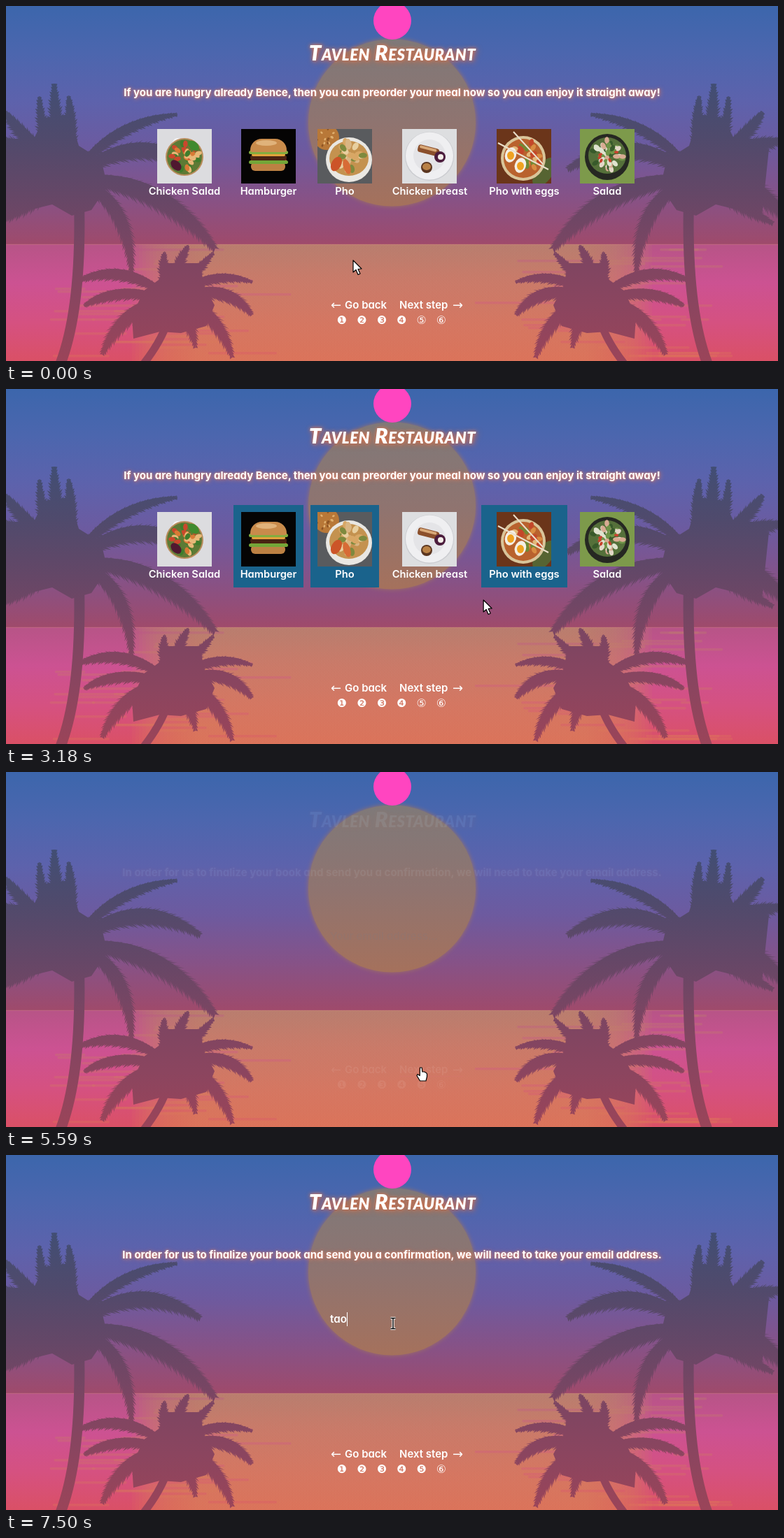
Recreate the animation shown at these times as an HTML page with a canvas. Size 1103 by 508 pixels, loop 8000 ms.

```html
<!DOCTYPE html>
<html lang="en">
<head>
<meta charset="utf-8">
<title>Meal preorder</title>
<style>
html, body { margin: 0; width: 100%; height: 100%; overflow: hidden; background: #5d60a6; }
#stage { position: relative; width: 1103px; height: 508px; overflow: hidden; color: #fff;
  font: 600 14.7px/1 Inter, "Noto Sans", sans-serif; font-feature-settings: "cv11"; cursor: default; }
canvas, .page, .item, .text, .line { position: absolute; left: 0; top: 0; }
.page { width: 1103px; height: 508px; transform-origin: 50% 254px; }
.text { white-space: pre; transform: translate(-50%, -50%); }
.left { transform: translate(0, -50%); }
.title { font: italic 900 31px/1 Lato, "Open Sans", sans-serif; font-variant: small-caps; letter-spacing: 0.5px;
  text-shadow: 2px 2px 8px #d9683f, 0 0 5px #d9805f; }
.head { font-weight: 700; font-size: 15px; text-shadow: 1px 1px 6px #e2795b, 0 0 3px #d98c78; }
.nav { font-size: 15px; }
.arrow { font: 400 18px/1 "DejaVu Sans", sans-serif; }
.dot { font: 400 16px/1 "DejaVu Sans", sans-serif; }
.item { top: 166px; height: 118px; box-sizing: border-box; border: 1px solid transparent; }
.line { left: 562px; top: 436.5px; width: 91px; height: 1.5px; background: #f45fa6; }
.field { display: flex; align-items: center; height: 20px; font-size: 15.2px; }
.caret { width: 1px; height: 20px; margin-right: -1px; background: #fff; }
.hint { color: #3f87bd; font-weight: 500; }
</style>
</head>
<body>
<div id="stage"></div>
<script>
const W = 1103, H = 508, LOOP = 8000, SWAP = 5590;
const stage = document.getElementById('stage');

function add(parent, tag, cls = '') {
  const el = document.createElement(tag);
  el.className = cls;
  parent.appendChild(el);
  return el;
}
function makeCanvas(parent, w, h) {
  const c = add(parent, 'canvas');
  c.width = w;
  c.height = h;
  return c.getContext('2d');
}
function text(parent, str, x, y, cls = '') {
  const el = add(parent, 'div', 'text ' + cls);
  el.textContent = str;
  el.style.left = x + 'px';
  el.style.top = y + 'px';
  return el;
}
function seeded(s) {
  return () => (s = (s * 16807) % 2147483647) / 2147483647;
}

// ---------- scenery ----------
const bg = makeCanvas(stage, W, H);

function vertical(y0, y1, ...colors) {
  const g = bg.createLinearGradient(0, y0, 0, y1);
  colors.forEach((c, i) => g.addColorStop(i / (colors.length - 1), c));
  return g;
}

function drawSky() {
  bg.fillStyle = vertical(0, 341, '#3c66ac', '#4c66ae', '#5d62ac', '#6d5a9f', '#865287', '#9f4a6b');
  bg.fillRect(0, 0, W, 341);
  bg.save();
  bg.shadowColor = '#a0735f';
  bg.shadowBlur = 6;
  bg.fillStyle = vertical(48, 287, '#7f7979', '#8f7470', '#a5715c');
  bg.beginPath();
  bg.arc(551.5, 167, 119.5, 0, 7);
  bg.fill();
  bg.restore();
}

function drawSea() {
  const pink = vertical(341, H, '#b75487', '#cc5292', '#d55181', '#da5066');
  const orange = vertical(341, H, '#bd826a', '#cb7d61', '#df7856');
  const rnd = seeded(77);
  bg.fillStyle = pink;
  bg.fillRect(0, 341, W, H);
  bg.fillStyle = orange;
  bg.globalAlpha = 0.1;
  for (let i = 0; i < 42; i++) {
    const x = 180 + i * 5;
    bg.fillRect(x, 341, W - 2 * x, H);
  }
  bg.globalAlpha = 0.3;
  for (let i = 0; i < 64; i++) {
    const y = 347 + Math.floor(rnd() * 39) * 4;
    const w = 40 + rnd() * 110, x = 60 + rnd() * 230;
    bg.fillStyle = x + w / 2 > 235 ? pink : orange;
    bg.beginPath();
    bg.roundRect(i % 2 ? x : W - x - w, y, w, 3.5, 2);
    bg.fill();
  }
  bg.globalAlpha = 0.25;
  bg.fillStyle = '#d98a80';
  bg.fillRect(0, 340.5, W, 1.5);
  bg.globalAlpha = 1;
}

// A curved blade, dense along the rib, with pointed leaflets at its edges.
function frond(x0, y0, cx, cy, x1, y1, len) {
  const n = Math.round(Math.hypot(x1 - x0, y1 - y0) / 4);
  for (let i = 1; i <= n; i++) {
    const t = i / n, u = 1 - t;
    const px = u * u * x0 + 2 * u * t * cx + t * t * x1;
    const py = u * u * y0 + 2 * u * t * cy + t * t * y1;
    let dx = u * (cx - x0) + t * (x1 - cx), dy = u * (cy - y0) + t * (y1 - cy);
    const d = Math.hypot(dx, dy) || 1;
    dx /= d;
    dy /= d;
    const fat = Math.sin(Math.PI * (0.1 + 0.86 * t));
    const l = len * (0.25 + 0.85 * fat) * [1, 0.8, 0.92][i % 3];
    bg.beginPath();
    bg.arc(px, py, 1 + len * 0.3 * fat, 0, 7);
    bg.fill();
    for (const s of [-1, 1]) {
      bg.beginPath();
      bg.moveTo(px - dx * 7, py - dy * 7);
      bg.lineTo(px + dx * 5, py + dy * 5);
      bg.lineTo(px + dx * l * 0.75 - dy * s * l * 0.55, py + dy * l * 0.75 + dx * s * l * 0.55 + l * 0.2);
      bg.fill();
    }
  }
}

const BIG = {
  base: [92, 248], trunk: [104, 262, 110, 430, 77, 514], width: 15,
  crown: [[54, 160], [90, 155], [104, 200], [136, 220], [145, 258], [122, 292], [94, 300], [66, 284],
    [0, 300], [-10, 205], [40, 190]],
  fronds: [
    [70, 190, 69, 116, 23], [95, 180, 90, 133, 18], [52, 210, 48, 134, 20],
    [30, 190, 2, 155, 22], [40, 195, -24, 192, 28], [20, 235, -34, 300, 32], [45, 275, -12, 308, 20],
    [148, 166, 240, 155, 17], [185, 170, 274, 230, 27], [220, 240, 296, 343, 31], [175, 265, 179, 377, 23]
  ]
};
const SMALL = {
  base: [237, 420], trunk: [234, 440, 226, 475, 195, 514], width: 11,
  crown: [[230, 368], [278, 368], [282, 398], [298, 428], [286, 458], [250, 468], [220, 466], [182, 476],
    [180, 445], [196, 408], [218, 392]],
  fronds: [
    [240, 375, 258, 346, 17], [222, 385, 226, 356, 16], [262, 388, 293, 356, 16],
    [170, 362, 104, 392, 18], [158, 398, 115, 426, 17], [168, 425, 139, 494, 22],
    [290, 374, 348, 393, 15], [315, 390, 349, 438, 20], [300, 425, 322, 498, 21], [262, 435, 270, 484, 18]
  ]
};

function drawPalm(p) {
  const [x0, y0, cx, cy, x1, y1] = p.trunk;
  bg.lineWidth = p.width;
  bg.beginPath();
  bg.moveTo(x0, y0);
  bg.quadraticCurveTo(cx, cy, x1, y1);
  bg.stroke();
  bg.beginPath();
  for (const [x, y] of p.crown) bg.lineTo(x, y);
  bg.fill();
  for (const f of p.fronds) frond(...p.base, ...f);
}

function drawPalms() {
  bg.fillStyle = bg.strokeStyle = vertical(110, H, '#414e74', '#504a6c', '#654767', '#7c4562', '#8b455f', '#9a4459');
  for (const mirror of [false, true]) {
    bg.save();
    if (mirror) bg.transform(-1, 0, 0, 1, 1080, 0);
    drawPalm(BIG);
    drawPalm(SMALL);
    bg.restore();
  }
}

drawSky();
drawSea();
drawPalms();
bg.fillStyle = '#ff45c0';
bg.beginPath();
bg.arc(552, 21, 27, 0, 7);
bg.fill();

// ---------- meal pictures ----------
function disc(g, color, x, y, rx, ry = rx, turn = 0) {
  g.fillStyle = color;
  g.beginPath();
  g.ellipse(x, y, rx, ry, turn, 0, 7);
  g.fill();
}
function block(g, color, x, y, w, h, r = 0) {
  g.fillStyle = color;
  g.beginPath();
  g.roundRect(x, y, w, h, r);
  g.fill();
}
function bits(g, x, y, r, n, size, colors) {
  const rnd = seeded(n * 31 + size);
  for (let i = 0; i < n; i++) {
    const a = rnd() * 6.28, d = r * Math.sqrt(rnd());
    disc(g, colors[i % colors.length], x + d * Math.cos(a), y + d * Math.sin(a), size, size * 0.65, a);
  }
}

const pictures = [
  g => {
    block(g, '#dcdcdf', 0, 0, 78, 78);
    disc(g, '#f3f3f4', 29, 20, 7);
    disc(g, '#b98c5c', 39, 40, 27);
    disc(g, '#5d7a35', 39, 40, 25);
    bits(g, 40, 40, 20, 34, 5, ['#d97a35', '#3f7d2c', '#e8b878', '#c9482c']);
    disc(g, '#4f1830', 27, 52, 9, 6, 0.8);
    disc(g, '#3f8a2e', 52, 24, 9, 6, 0.7);
  },
  g => {
    block(g, '#050404', 0, 0, 78, 78);
    block(g, '#bd8143', 14, 47, 49, 13, 6);
    block(g, '#c73d25', 14, 43, 51, 6, 3);
    block(g, '#74a638', 11, 45, 56, 5, 3);
    block(g, '#4a2312', 13, 37, 52, 8, 4);
    block(g, '#e2a23b', 15, 35, 48, 4, 2);
    block(g, '#83ad40', 11, 31, 56, 5, 3);
    block(g, '#c98b4b', 13, 14, 52, 19, [24, 24, 4, 4]);
    disc(g, '#e0b27a', 36, 20, 15, 4);
  },
  g => {
    block(g, '#595b5e', 0, 0, 78, 78);
    disc(g, '#b87838', 13, 12, 18);
    bits(g, 12, 11, 14, 14, 2, ['#e0b070', '#8d5424']);
    disc(g, '#e9e7e2', 45, 44, 33, 32);
    disc(g, '#c4924f', 45, 42, 28, 25);
    bits(g, 46, 38, 20, 24, 6, ['#e8cf9f', '#d8a765', '#7e8a3e', '#d9b583']);
    disc(g, '#cc5428', 27, 50, 7, 11, 0.5);
    disc(g, '#d76b36', 42, 54, 5, 11, -0.3);
  },
  g => {
    block(g, '#dddee0', 0, 0, 78, 78);
    disc(g, '#cbccd0', 39, 39, 35);
    disc(g, '#efeff1', 39, 38.5, 34);
    disc(g, '#e4e4e7', 39, 38, 23);
    g.save();
    g.translate(37, 31);
    g.rotate(0.25);
    block(g, '#8b4f2b', -15, -6, 31, 11, 4);
    block(g, '#d8a878', -13, -5, 25, 4, 2);
    g.restore();
    disc(g, '#4b1c3c', 54, 40, 8);
    disc(g, '#f3ede8', 55, 40, 4);
    disc(g, '#5b3620', 35, 55, 8);
    disc(g, '#b98146', 35, 54, 6, 5);
  },
  g => {
    block(g, '#6b351a', 0, 0, 78, 78);
    disc(g, '#566432', 68, 62, 12, 24, 0.6);
    disc(g, '#d9c59a', 38, 42, 32);
    disc(g, '#b9622e', 38, 42, 28);
    bits(g, 44, 38, 20, 26, 5, ['#d98c42', '#c4472a', '#e2b87a', '#6f8a35']);
    for (const [x, y] of [[20, 37], [34, 52]]) {
      disc(g, '#f4efe6', x, y, 8, 11, 0.3);
      disc(g, '#efa222', x, y + 1, 5, 6);
    }
    g.strokeStyle = '#eadfcb';
    g.lineWidth = 2;
    g.beginPath();
    g.moveTo(2, 20);
    g.lineTo(74, 58);
    g.moveTo(24, 4);
    g.lineTo(66, 50);
    g.stroke();
  },
  g => {
    block(g, '#7d9a4b', 0, 0, 78, 78);
    disc(g, '#262822', 39, 40, 32, 33);
    disc(g, '#55703a', 39, 38, 27, 26);
    bits(g, 39, 38, 22, 38, 5, ['#e3d8c8', '#6f9448', '#d8ab92', '#385a2b', '#dfe3cf']);
    bits(g, 37, 33, 17, 5, 3, ['#c8402c']);
  }
];

// ---------- pages ----------
function makePage(heading, y, done) {
  const page = add(stage, 'div', 'page');
  text(page, 'Tavlen Restaurant', 552, 66, 'title');
  text(page, heading, 551.5, y, 'head');
  text(page, '←', 464, 428, 'arrow left');
  text(page, 'Go back', 484, 427, 'nav left');
  text(page, 'Next step', 562, 427, 'nav left');
  text(page, '→', 638, 428, 'arrow left');
  for (let i = 0; i < 6; i++) {
    text(page, String.fromCharCode((i < done ? 0x2776 : 0x2460) + i), 480 + i * 28.4, 450, 'dot');
  }
  page.line = add(page, 'div', 'line');
  return page;
}

const menu = makePage('If you are hungry already Bence, then you can preorder your meal now so you can enjoy it straight away!', 123, 4);
const form = makePage('In order for us to finalize your book and send you a confirmation, we will need to take your email address.', 142, 5);

// name, left, width, times of clicks
const items = [
  ['Chicken Salad', 194, 122, []],
  ['Hamburger', 325, 100, [700]],
  ['Pho', 435, 98, [1660, 4040]],
  ['Chicken breast', 541, 129, []],
  ['Pho with eggs', 679, 123, [2620]],
  ['Salad', 810, 98, []]
].map(([name, x, w, clicks], i) => {
  const el = add(menu, 'div', 'item');
  el.style.left = x + 'px';
  el.style.width = w + 'px';
  const g = makeCanvas(el, 78, 78);
  g.canvas.style.left = Math.floor((w - 78) / 2) - 1 + 'px';
  g.canvas.style.top = '9px';
  pictures[i](g);
  text(el, name, w / 2 - 1, 97.7);
  return { el, x, w, clicks };
});

const field = text(form, '', 463, 235, 'left field');
const typed = add(field, 'span');
const caret = add(field, 'i', 'caret');
const hint = add(field, 'span', 'hint');
hint.textContent = 'Your email address...';

// ---------- pointer ----------
const top2d = makeCanvas(stage, W, H);
const START = [496, 364];
// start, end, steps, bend x, bend y, goal x, goal y
const moves = [
  [80, 380, 5, 430, 300, 392, 258],
  [950, 1340, 6, 467, 276, 462, 262],
  [1830, 2380, 8, 590, 338, 730, 260],
  [3030, 3810, 11, 600, 400, 459, 265],
  [4380, 5090, 10, 500, 390, 593, 423],
  [5830, 6380, 8, 575, 310, 552, 240],
  [6450, 6450, 1, 553, 241, 553, 241]
];

function pointerAt(t) {
  let [x, y] = START;
  for (const [t0, t1, n, cx, cy, gx, gy] of moves) {
    if (t < t0) break;
    const gap = (t1 - t0) / (n - 1) || 1;
    const k = Math.min(n - 1, Math.floor((t - t0) / gap + 0.15));
    const p = (k + 1) / n, s = p * p * (3 - 2 * p), u = 1 - s;
    x = u * u * x + 2 * u * s * cx + s * s * gx;
    y = u * u * y + 2 * u * s * cy + s * s * gy;
  }
  return [x, y];
}

const ARROW = [[0, 0], [0, 17], [4, 13.5], [7, 20.5], [10, 19], [7, 12.5], [12, 12]];
const HAND = [[-1.5, 0], [1.2, 0], [1.8, 6], [4.5, 6], [7, 7.2], [8.5, 8.8], [8.5, 13], [7, 19],
  [-1.5, 19], [-6, 11.5], [-5, 9.6], [-1.8, 11.5]];

function drawShape(points, x, y) {
  top2d.beginPath();
  for (const [px, py] of points) top2d.lineTo(x + px, y + py);
  top2d.closePath();
  top2d.fillStyle = '#fff';
  top2d.fill();
  top2d.strokeStyle = '#000';
  top2d.lineWidth = 1.2;
  top2d.lineJoin = 'round';
  top2d.stroke();
}
function drawBeam(x, y) {
  for (const [color, w] of [['#fff', 3.4], ['#000', 1.4]]) {
    top2d.strokeStyle = color;
    top2d.lineWidth = w;
    top2d.beginPath();
    top2d.moveTo(x - 3.5, y - 7.5);
    top2d.lineTo(x + 3.5, y - 7.5);
    top2d.moveTo(x, y - 7.5);
    top2d.lineTo(x, y + 7.5);
    top2d.moveTo(x - 3.5, y + 7.5);
    top2d.lineTo(x + 3.5, y + 7.5);
    top2d.stroke();
  }
}

// ---------- playback ----------
const show = (el, on) => { el.style.visibility = on ? 'inherit' : 'hidden'; };

function render(t) {
  const [x, y] = pointerAt(t);
  const second = t >= SWAP;
  const inside = (l, tp, r, b) => x >= l && x <= r && y >= tp && y <= b;
  const onLink = inside(562, 416, 654, 438);
  let hand = onLink;

  show(menu, !second);
  show(form, second);
  show(menu.line, onLink);
  show(form.line, onLink);

  for (const { el, x: left, w, clicks } of items) {
    const hover = !second && inside(left, 166, left + w, 284);
    const picked = clicks.filter(c => t >= c).length % 2;
    el.style.backgroundColor = picked ? '#1a638c' : 'transparent';
    el.style.borderColor = hover ? '#f45fa6' : picked ? '#1a638c' : 'transparent';
    hand = hand || hover;
  }

  const fade = Math.max(0, Math.min(1, (t - 5570) / 300));
  form.style.opacity = fade;
  form.style.transform = fade < 1 ? `scaleY(${1 - 0.012 * (1 - fade)})` : 'none';
  typed.textContent = 'tao'.slice(0, [7190, 7260, 7500].filter(k => t >= k).length);
  show(hint, second && t < 7190);
  show(caret, t >= 6450 && (t < 7020 || t >= 7190));

  top2d.clearRect(0, 0, W, H);
  if (second && inside(455, 222, 650, 250)) drawBeam(x, y);
  else drawShape(hand ? HAND : ARROW, x, y);
}

const begin = performance.now();
function tick() {
  render((performance.now() - begin) % LOOP);
  requestAnimationFrame(tick);
}
tick();
</script>
</body>
</html>
```
